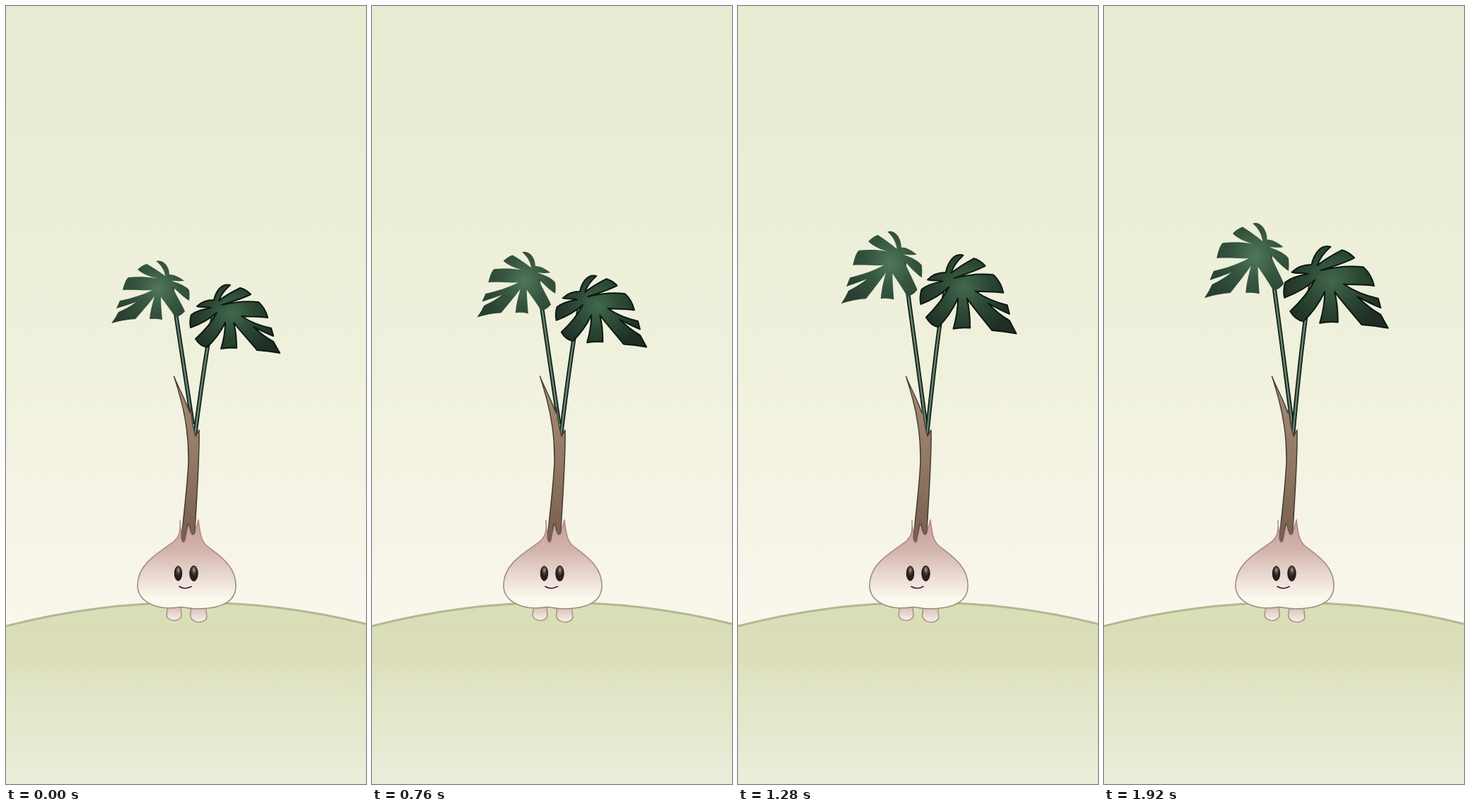
Animation, 509 px wide and 1101 px high, one loop 1960 ms. Source, as an HTML page:

```html
<!DOCTYPE html>
<html lang="en">
<head>
<meta charset="utf-8">
<title>Sprout</title>
<style>
  html, body { margin: 0; width: 100%; height: 100%; overflow: hidden; background: #f0f1de; }
  svg { display: block; width: 100%; height: 100%; }
</style>
</head>
<body>
<svg viewBox="0 0 509 1101" stroke-linejoin="round">
  <defs>
    <linearGradient id="sky" gradientUnits="userSpaceOnUse" x1="0" y1="0" x2="0" y2="860">
      <stop offset="0" stop-color="#e8ebd2"/>
      <stop offset=".3" stop-color="#ebeed7"/>
      <stop offset=".6" stop-color="#f0f1dd"/>
      <stop offset=".8" stop-color="#f5f3e5"/>
      <stop offset="1" stop-color="#f9f6ec"/>
    </linearGradient>
    <linearGradient id="grass" gradientUnits="userSpaceOnUse" x1="0" y1="844" x2="0" y2="1101">
      <stop offset="0" stop-color="#d8dfb6"/>
      <stop offset=".3" stop-color="#dcddb9"/>
      <stop offset=".42" stop-color="#e0e3c2"/>
      <stop offset="1" stop-color="#ebeedb"/>
    </linearGradient>
    <linearGradient id="skin" x1="0" y1="0" x2="0" y2="1">
      <stop offset="0" stop-color="#c59d98"/>
      <stop offset=".35" stop-color="#d3b5ae"/>
      <stop offset=".65" stop-color="#ebdcd4"/>
      <stop offset=".88" stop-color="#fbf8ed"/>
      <stop offset="1" stop-color="#fbf9ee"/>
    </linearGradient>
    <linearGradient id="rim" x1="0" y1="0" x2="0" y2="1">
      <stop offset="0" stop-color="#b88b86"/>
      <stop offset=".4" stop-color="#a48c80"/>
      <stop offset="1" stop-color="#99907c"/>
    </linearGradient>
    <linearGradient id="foot" x1="0" y1="0" x2="0" y2="1">
      <stop offset="0" stop-color="#d5bab3"/>
      <stop offset="1" stop-color="#f8f1e8"/>
    </linearGradient>
    <linearGradient id="bark" x1="0" y1="0" x2="0" y2="1">
      <stop offset="0" stop-color="#a58c77"/>
      <stop offset=".5" stop-color="#947965"/>
      <stop offset="1" stop-color="#775d4d"/>
    </linearGradient>
    <linearGradient id="barkRim" x1="0" y1="0" x2="0" y2="1">
      <stop offset="0" stop-color="#4b4234"/>
      <stop offset=".85" stop-color="#3b3a2d"/>
      <stop offset="1" stop-color="#8a6b5f"/>
    </linearGradient>
    <radialGradient id="leafLight" gradientUnits="userSpaceOnUse" cx="216" cy="400" r="66">
      <stop offset="0" stop-color="#51775a"/>
      <stop offset=".45" stop-color="#365640"/>
      <stop offset="1" stop-color="#283f31"/>
    </radialGradient>
    <radialGradient id="leafDark" gradientUnits="userSpaceOnUse" cx="319" cy="435" r="66">
      <stop offset="0" stop-color="#42694b"/>
      <stop offset=".5" stop-color="#2b4734"/>
      <stop offset="1" stop-color="#1f2d25"/>
    </radialGradient>
    <radialGradient id="eye" cx=".52" cy=".27" r=".4">
      <stop offset="0" stop-color="#b3b09a"/>
      <stop offset=".45" stop-color="#5a4d49"/>
      <stop offset="1" stop-color="#2c1e20"/>
    </radialGradient>
  </defs>

  <rect width="509" height="1101" fill="url(#sky)"/>
  <path d="M-4 878.500Q258 811 513 875.500V1110H-4Z" fill="url(#grass)" stroke="#b3b793" stroke-width="3"/>

  <g fill="none">
    <g id="leftStem"><path stroke="#0c1913" stroke-width="6"/><path stroke="#64826f" stroke-width="2.700"/></g>
    <g id="rightStem"><path stroke="#0c1913" stroke-width="6"/><path stroke="#64826f" stroke-width="2.700"/></g>
  </g>

  <path id="leftLeaf" fill="url(#leafLight)" d="M212 361C222 358 231 368 231 380C238 380 246 384 252 389
    C245 390 239 389 234 389C244 392 254 396 259 402Q260 409 259 417C250 412 243 404 235 397
    C240 408 249 423 253 432Q246 440 239 440C232 429 225 420 219 412C219 421 220 433 221 444
    Q212 442 203 443C204 431 207 421 210 411C203 420 191 434 183 443Q166 444 149 449
    Q155 441 159 433Q173 427 184 419Q170 424 156 428L161 417C176 414 193 409 207 402
    C195 403 179 401 165 402C167 393 170 386 173 384C191 382 209 384 222 387
    C209 385 195 381 186 373Q192 367 199 365C208 370 217 376 225 382C224 374 219 366 212 361Z"/>
  <path id="rightLeaf" fill="url(#leafDark)" stroke="#0d1812" stroke-width="2" vector-effect="non-scaling-stroke"
    d="M317 395C305 392 297 403 294 416C285 416 276 419 270 425C277 427 284 425 290 427
    C278 429 267 433 262 437Q259 446 261 455C275 450 288 443 298 434C291 448 279 461 268 471
    Q274 481 284 483C295 473 304 460 310 448C310 460 308 472 304 485Q315 483 326 484
    C326 472 325 460 322 448C332 461 345 475 355 487Q370 488 387 491L378 475
    C367 469 358 462 350 454C358 458 368 463 378 467L375 456C361 453 345 447 333 439
    C344 440 356 439 370 441Q367 428 357 419C340 417 322 419 305 423
    C320 418 335 414 346 408Q339 401 331 399C321 404 310 410 301 417C304 408 310 401 317 395Z"/>

  <g stroke="#a19384" stroke-width="1.5" fill="url(#foot)">
    <path d="M229 849L227 862C229 872 246 872 248 863L247 849Z"/>
    <path d="M262 849L260.500 863C262 874 282 875 284 865L282 849Z"/>
  </g>
  <path fill="url(#skin)" stroke="url(#rim)" stroke-width="1.6" d="M246 728C247 746 245 751 236 759
    C215 774 186 790 186 820C186 843 212 852 230 852C240 852 245 851 248 850.500
    C253 851 260 853 270 853C302 853 325 845 325 820C325 790 297 775 283 763
    C275 756 274 742 272 727Q269 742 264 746L258 732L250 752Q246 742 246 728Z"/>
  <path fill="url(#bark)" stroke="url(#barkRim)" stroke-width="1.5" d="M237.500 524C243 539 252 553 260 576
    L261 568C262 582 265 598 268 609L273 600C274 640 269 700 267 745Q264 752 261 743
    Q259 733 257 733Q256 738 253 756Q250 763 248 752C252 715 258 665 258 640
    C258 612 254 582 247 556Q243 541 237.500 524Z"/>

  <g fill="url(#eye)" stroke="#1d1416">
    <ellipse cx="243.500" cy="803" rx="5.200" ry="10.300"/>
    <ellipse cx="265.500" cy="803" rx="5.700" ry="10.800"/>
  </g>
  <path d="M245 821.500Q253 826.500 262 821.500" fill="none" stroke="#2b2020" stroke-width="1.6" stroke-linecap="round"/>
</svg>
<script>
const LOOP = 1960, STEP = 40;
const $ = id => document.getElementById(id);

// [time, value] pairs joined by a smooth curve
const lift = [[0, 0], [440, .02], [560, .08], [760, .24], [1120, .63], [1280, .78], [1600, .98], [1720, 1], [1960, 1]];
const spread = [[0, 0], [180, -.06], [440, -.06], [760, .07], [1120, .3], [1280, .44], [1600, .79], [1960, 1.03]];

const leaves = [
  { leaf: $('leftLeaf'), stem: $('leftStem'), x: 235.5, y: 360, rise: 53.5, widen: .081,
    points: [[234, 396], [245, 466]], foot: p => [264 + 2 * p, 592] },
  { leaf: $('rightLeaf'), stem: $('rightStem'), x: 297, y: 394, rise: 54.5, widen: .162,
    points: [[297, 423], [287, 455]], foot: () => [267, 608] }
];

function sample(keys, t) {
  const slope = i => {
    const [a, b] = [keys[Math.max(i - 1, 0)], keys[Math.min(i + 1, keys.length - 1)]];
    return (b[1] - a[1]) / (b[0] - a[0]);
  };
  const i = Math.max(0, keys.findIndex(k => k[0] > t) - 1);
  const [t0, a] = keys[i], [t1, b] = keys[i + 1], d = t1 - t0, u = (t - t0) / d;
  return a + (b - a) * u * u * (3 - 2 * u)
    + d * u * (1 - u) * (slope(i) * (1 - u) - slope(i + 1) * u);
}

function draw(now) {
  const t = Math.floor(now % LOOP / STEP) * STEP;
  const p = sample(lift, t), q = sample(spread, t);
  for (const { leaf, stem, x, y, rise, widen, points, foot } of leaves) {
    const sx = 1 + widen * q, sy = 1 + .2 * p;
    const dx = x * (1 - sx), dy = y * (1 - sy) - rise * p;
    leaf.setAttribute('transform', `matrix(${sx} 0 0 ${sy} ${dx} ${dy})`);
    const [top, bend] = points.map(([px, py]) => [px * sx + dx, py * sy + dy]);
    for (const line of stem.children) line.setAttribute('d', `M${top}Q${bend} ${foot(p)}`);
  }
  requestAnimationFrame(draw);
}
requestAnimationFrame(draw);
</script>
</body>
</html>
```
